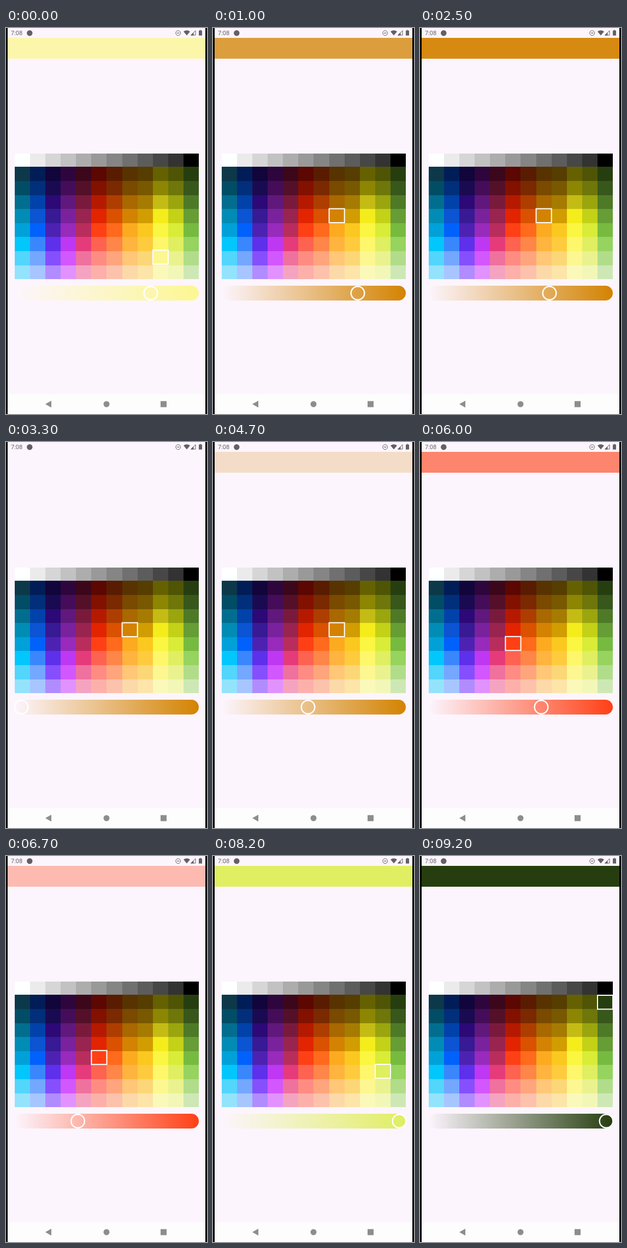
An HTML page with a canvas that plays this animation: 368x704 px, repeating every 9.7 s.

```html
<!DOCTYPE html>
<html lang="en">
<head>
<meta charset="utf-8">
<title>Colour picker</title>
<style>
html, body { margin: 0; width: 368px; height: 704px; overflow: hidden; background: #000; }
canvas { display: block; }
</style>
</head>
<body>
<canvas id="stage" width="368" height="704"></canvas>
<script>
const ctx = document.getElementById('stage').getContext('2d');
const LOOP = 9700;
const BG = '#fcf5fd';
const ICON = '#626064';

const palette = `
feffff ebebeb d6d6d6 c2c2c2 adadad 999999 858585 707070 5c5c5c 474747 333333 000000
0c384a 011d57 11053b 2e063d 3c071b 5c0701 5a1c00 583300 563d00 666100 4f5504 263e0f
004d65 012f7b 1a0a52 450d59 551029 831100 7b2900 7a4a00 785800 8d8602 6f760a 38571a
016e8f 0042a9 2c0977 61187c 791a3d b51a00 ad3e00 a96800 a67b01 c4bc14 9ba50e 4e7a27
008cb4 0b54d3 371a94 7a219e 99244f e22400 da5100 d38301 d19d01 f5ec1c c3d117 669d34
00a1d8 0061fd 4d22b2 982abc b92d5d ff4015 ff6a1c fcab20 fbc820 fbf641 d9ec37 76bb40
01c7fc 3a87fd 5e30eb be38f3 e63b7a fe6250 fe8648 feb43f fecb3e fef76b e0ee62 96d35f
52d6fc 74a7ff 864ffd d357fe ee719e ff8c82 ffa57d ffc777 fbd777 fcf791 eaf28f b1dd8b
93e3fc a7c6ff b18cfe e292fe f4a4c0 fdb0aa fcc2ab fcd9a8 fde4a8 fbf9b9 f2f7b7 cde8b5
`.trim().split('\n').map(row => row.split(' ').map(hex => '#' + hex));

const picks = [[0, 9, 7], [1000, 7, 4], [5200, 5, 5], [7300, 10, 6], [8700, 11, 4], [9200, 11, 1]];
const drags = [[0, 265], [2000, 319], [2500, 237], [3000, 150], [3100, 65], [3200, 28],
  [4300, 94], [4700, 174], [5900, 222], [6200, 175], [6600, 131.5], [7900, 341]];

const latest = (events, t) => events.filter(e => e[0] <= t).pop().slice(1);

// The header follows the thumb late; the last drag is held longer.
const headerDrags = drags.map(([t, x]) => [t === 0 ? 0 : t + (t === 7900 ? 300 : 100), x]);

function rect(color, x, y, w, h) {
  ctx.fillStyle = color;
  ctx.fillRect(x, y, w, h);
}

function poly(color, ...points) {
  ctx.fillStyle = color;
  ctx.beginPath();
  points.forEach(([x, y]) => ctx.lineTo(x, y));
  ctx.fill();
}

function disc(color, x, y, r) {
  ctx.fillStyle = color;
  ctx.beginPath();
  ctx.arc(x, y, r, 0, Math.PI * 2);
  ctx.fill();
}

function ring(color, x, y, r, width) {
  ctx.strokeStyle = color;
  ctx.lineWidth = width;
  ctx.beginPath();
  ctx.arc(x, y, r, 0, Math.PI * 2);
  ctx.stroke();
}

function drawStatus() {
  ctx.fillStyle = ICON;
  ctx.font = '11px Roboto, sans-serif';
  ctx.fillText('7:08', 9, 13);
  disc(ICON, 43.3, 9.2, 5.2);
  ring(ICON, 315.2, 9.2, 4.4, 1);
  rect(ICON, 313, 8.6, 4.5, 1.2);
  ctx.fillStyle = ICON;
  ctx.beginPath();
  ctx.moveTo(331, 13.6);
  ctx.lineTo(325, 6.4);
  ctx.quadraticCurveTo(331, 2.2, 337, 6.4);
  ctx.fill();
  ctx.strokeStyle = ICON;
  ctx.lineWidth = 1;
  ctx.beginPath();
  ctx.moveTo(338.6, 13);
  ctx.lineTo(347, 4.8);
  ctx.lineTo(347, 13);
  ctx.closePath();
  ctx.stroke();
  poly(ICON, [338, 13.5], [343.5, 8], [343.5, 13.5]);
  rect(ICON, 353, 4.7, 6, 9);
  rect(ICON, 354.8, 3.6, 2.4, 1.2);
}

function drawNav() {
  const gray = '#8d8d8d';
  rect('#fdfdfd', 3, 668, 362, 36);
  poly(gray, [72, 686], [83, 679.8], [83, 692.2]);
  disc(gray, 184, 686, 5.5);
  rect(gray, 283, 680.5, 11, 11);
}

function drawGrid() {
  const colX = c => Math.round(16 + c * 28.08);
  const rowY = r => r ? Math.round(253.2 + (r - 1) * 25.65) : 229;
  palette.forEach((row, r) => row.forEach((color, c) =>
    rect(color, colX(c), rowY(r), colX(c + 1) - colX(c), rowY(r + 1) - rowY(r))));
}

function drawSelection(color, col, row) {
  const x = 15.9 + col * 28.1, y = 254 + (row - 1) * 25.2;
  rect(color, x, y, 28.1, 25.4);
  ctx.strokeStyle = '#fff';
  ctx.lineWidth = 2;
  ctx.strokeRect(x, y, 28.1, 25.4);
}

function drawSlider(color, x) {
  const fade = ctx.createLinearGradient(16, 0, 353, 0);
  fade.addColorStop(0, color + '00');
  fade.addColorStop(1, color);
  ctx.fillStyle = fade;
  ctx.beginPath();
  ctx.roundRect(16, 470, 337, 27, 13.5);
  ctx.fill();
  ring('#fff', x, 483.5, 12.3, 2.4);
}

function draw(t) {
  const [col, row] = latest(picks, t);
  const [thumb] = latest(drags, t);
  const [headerX] = latest(headerDrags, t);
  const color = palette[row][col];

  rect('#000', 0, 0, 368, 704);
  rect(BG, 3, 0, 362, 704);
  ctx.globalAlpha = (headerX - 28) / 313;
  rect(color, 3, 18, 362, 38);
  ctx.globalAlpha = 1;
  drawStatus();
  drawGrid();
  drawSelection(color, col, row);
  drawSlider(color, thumb);
  drawNav();
}

function tick() {
  draw(performance.now() % LOOP);
  requestAnimationFrame(tick);
}
tick();
</script>
</body>
</html>
```
